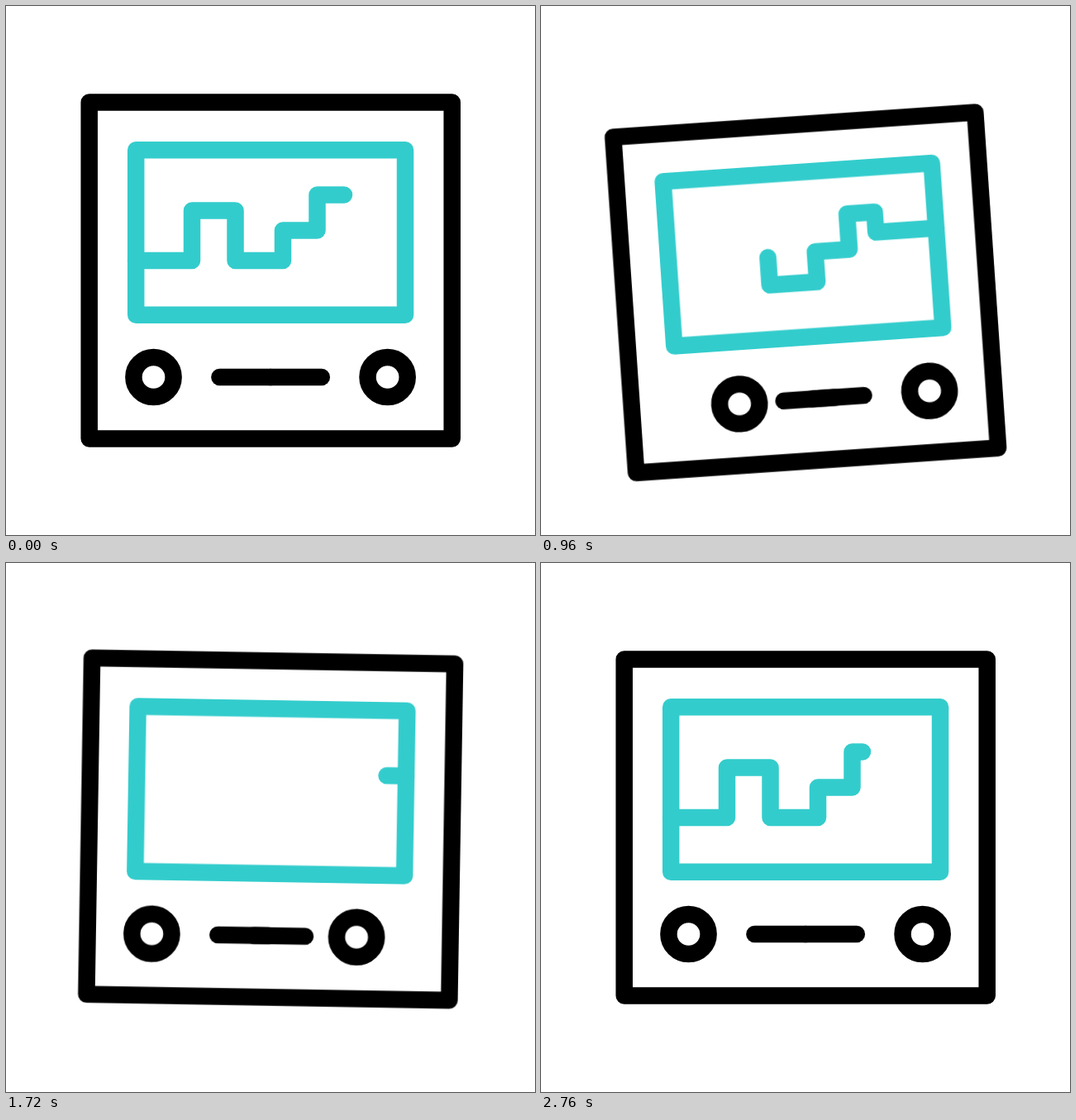
These frames come from a looping animation (640 px wide and 640 px high, 2.8 s). An HTML page:

```html
<!DOCTYPE html>
<html lang="en">
<head>
<meta charset="utf-8">
<title>Signal monitor</title>
<style>
  html, body { margin: 0; width: 100%; height: 100%; overflow: hidden; background: #fff; }
  svg { display: block; width: 100vw; height: 100vh; }

  g, path, circle { animation: 2800ms linear infinite; }
  path, rect, circle {
    fill: none; stroke: #000; stroke-width: 20.5;
    stroke-linecap: round; stroke-linejoin: round;
  }
  .screen { stroke: #3cc; }

  .bob, .left, .right { animation-timing-function: cubic-bezier(.333, 0, .667, 1); }
  .bob { animation-name: bob; }
  .tilt { animation-name: tilt; transform-origin: 320.2px 320px; }
  .wave { animation-name: wave; stroke-dasharray: 551 600; }
  .left { animation-name: left; }
  .right { animation-name: right; }
  circle { --d: 64px; }
  .bar { --d: 32px; }

  @keyframes bob {
    0%, 7.143% { transform: translateY(0); }
    28.571% { transform: translateY(38px); }
    50.1% { transform: translateY(-26.5px); }
    71.429% { transform: translateY(25.3px); }
    92.857%, 100% { transform: translateY(0); }
  }
  @keyframes tilt {
    0%, 7.14% { transform: rotate(0deg); }
    11.43% { transform: rotate(-.2deg); }
    15.71% { transform: rotate(-.7deg); }
    20% { transform: rotate(-1.46deg); }
    24.29% { transform: rotate(-2.36deg); }
    28.57% { transform: rotate(-3.25deg); }
    32.14% { transform: rotate(-3.82deg); }
    34.29% { transform: rotate(-3.93deg); }
    37.14% { transform: rotate(-3.7deg); }
    40% { transform: rotate(-3.2deg); }
    42.86% { transform: rotate(-2.55deg); }
    48.57% { transform: rotate(-1.25deg); }
    54.29% { transform: rotate(-.17deg); }
    60% { transform: rotate(.78deg); }
    65% { transform: rotate(1.35deg); }
    70% { transform: rotate(1.83deg); }
    72.5% { transform: rotate(2.15deg); }
    75% { transform: rotate(1.9deg); }
    80% { transform: rotate(1.07deg); }
    84.29% { transform: rotate(.58deg); }
    88.57% { transform: rotate(.2deg); }
    92.86%, 100% { transform: rotate(0deg); }
  }
  /* the trace is wiped from its start, then drawn again */
  @keyframes wave {
    0% { stroke-dashoffset: 99px; }
    7.07%, 16.64% { stroke-dashoffset: 0px; }
    63.46% { stroke-dashoffset: -551px; animation-timing-function: step-end; }
    67.79% { stroke-dashoffset: 551px; }
    100% { stroke-dashoffset: 99px; }
  }
  @keyframes left {
    0%, 7.143% { transform: translateX(0); }
    28.571% { transform: translateX(var(--d)); }
    50%, 100% { transform: translateX(0); }
  }
  @keyframes right {
    0%, 50% { transform: translateX(0); }
    71.429% { transform: translateX(calc(-1 * var(--d))); }
    92.857%, 100% { transform: translateX(0); }
  }
</style>
</head>
<body>
<svg viewBox="0 0 640 640">
  <g class="bob">
    <g class="tilt">
      <rect x="100.7" y="116.5" width="439" height="407"/>
      <path class="screen wave" d="M157 308H225V247.5H277.5V308H335V271.5H376.5V228.5H410V253H483"/>
      <rect class="screen" x="157.2" y="174.2" width="325.8" height="199.6"/>
      <circle class="left" cx="178.5" cy="449" r="24.1"/>
      <circle class="right" cx="461.6" cy="449" r="24.1"/>
      <path class="bar left" d="M258.4 449H320"/>
      <path class="bar right" d="M320 449H381.8"/>
    </g>
  </g>
</svg>
</body>
</html>
```
